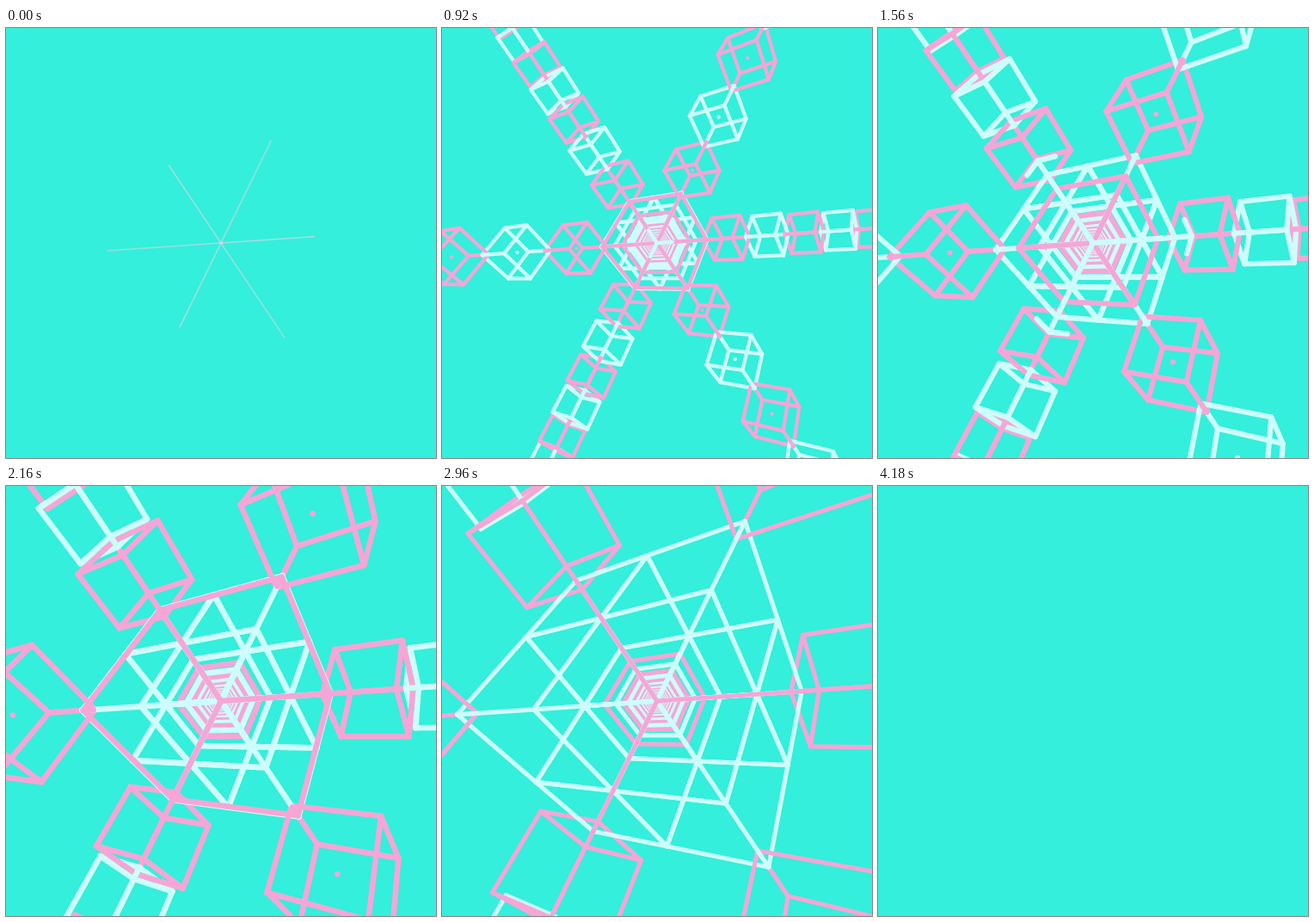
Recreate the animation shown at these times as an HTML page with a canvas. Size 500x500 px, loop 4.2 s.

```html
<!DOCTYPE html>
<html lang="en">
<head>
<meta charset="utf-8">
<title>Cube chains</title>
<style>
  html, body { margin: 0; width: 100%; height: 100%; overflow: hidden; background: #33efdb; }
  canvas { display: block; width: 500px; height: 500px; }
</style>
</head>
<body>
<canvas id="stage" width="500" height="500"></canvas>
<script>
const ctx = document.getElementById('stage').getContext('2d');
const LOOP = 4200, STEP = 20, FRAMES = LOOP / STEP;
const SIZE = 500, MID = SIZE / 2;
const EYE = MID / Math.tan(Math.PI / 6);
const NEAR = 245;            // nothing closer to the eye than this depth is drawn
const CUBES = 100;           // cubes per chain
const GAP = 154.5, EDGE = 168.8, STROKE = 6.6;
const BACK = '#33efdb', COLORS = ['#cdfefb', '#f6a6d6'];

// The view runs along a cube diagonal, so the three axes fan out evenly.
const AXES = [0, 1, 2].map(j => {
  const a = (-3.9 + 120 * j) * Math.PI / 180, r = Math.sqrt(2 / 3);
  return [r * Math.cos(a), r * Math.sin(a), 1 / Math.sqrt(3)];
});

const CORNERS = [...Array(8).keys()].map(n => [n & 1, n >> 1 & 1, n >> 2 & 1]);
const EDGES = [];
for (let n = 0; n < 8; n++)
  for (const bit of [1, 2, 4]) if (!(n & bit)) EDGES.push([n, n | bit]);

function toView(c) {
  return [0, 1, 2].map(i => c[0] * AXES[0][i] + c[1] * AXES[1][i] + c[2] * AXES[2][i]);
}

function project([x, y, z]) {
  const s = EYE / (EYE - z);
  return [MID + x * s, MID + y * s];
}

function clip(p, q) {
  if (p[2] <= NEAR) return p;
  const u = (NEAR - q[2]) / (p[2] - q[2]);
  return p.map((v, i) => q[i] + (v - q[i]) * u);
}

function outside(a, b, pad) {
  return [0, 1].some(i =>
    Math.max(a[i], b[i]) < -pad || Math.min(a[i], b[i]) > SIZE + pad);
}

function collect(t, pad) {
  const lines = [], gap = GAP * t, edge = EDGE * t;
  const add = (p, q, color) => {
    if (p[2] >= NEAR && q[2] >= NEAR) return;
    const a = project(clip(p, q)), b = project(clip(q, p));
    if (!outside(a, b, pad)) lines.push({ a, b, color, z: p[2] + q[2] });
  };
  for (const dir of CORNERS) {
    const sign = dir.map(d => d ? 1 : -1);
    for (let k = 0; k < CUBES; k++) {
      const color = COLORS[k % 2];
      const at = c => toView(sign.map((s, i) => s * (k * gap + c[i] * edge)));
      const pts = CORNERS.map(at);
      for (const [m, n] of EDGES) add(pts[m], pts[n], color);
      const core = at([0.5, 0.5, 0.5]);
      add(core, core, color);
    }
  }
  return lines.sort((p, q) => p.z - q.z);
}

function draw(t) {
  ctx.fillStyle = BACK;
  ctx.fillRect(0, 0, SIZE, SIZE);
  const width = STROKE * Math.sin(Math.PI * t);
  if (width < 0.01) return;
  ctx.lineWidth = width;
  ctx.lineCap = 'round';
  for (const { a, b, color } of collect(t, width)) {
    ctx.strokeStyle = color;
    ctx.beginPath();
    ctx.moveTo(a[0], a[1]);
    ctx.lineTo(b[0], b[1]);
    ctx.stroke();
  }
}

const start = performance.now();
let shown = -1;
function tick() {
  const step = Math.floor((performance.now() - start) % LOOP / STEP);
  if (step !== shown) {
    shown = step;
    draw((step + 1) / FRAMES);
  }
  requestAnimationFrame(tick);
}
tick();
</script>
</body>
</html>
```
